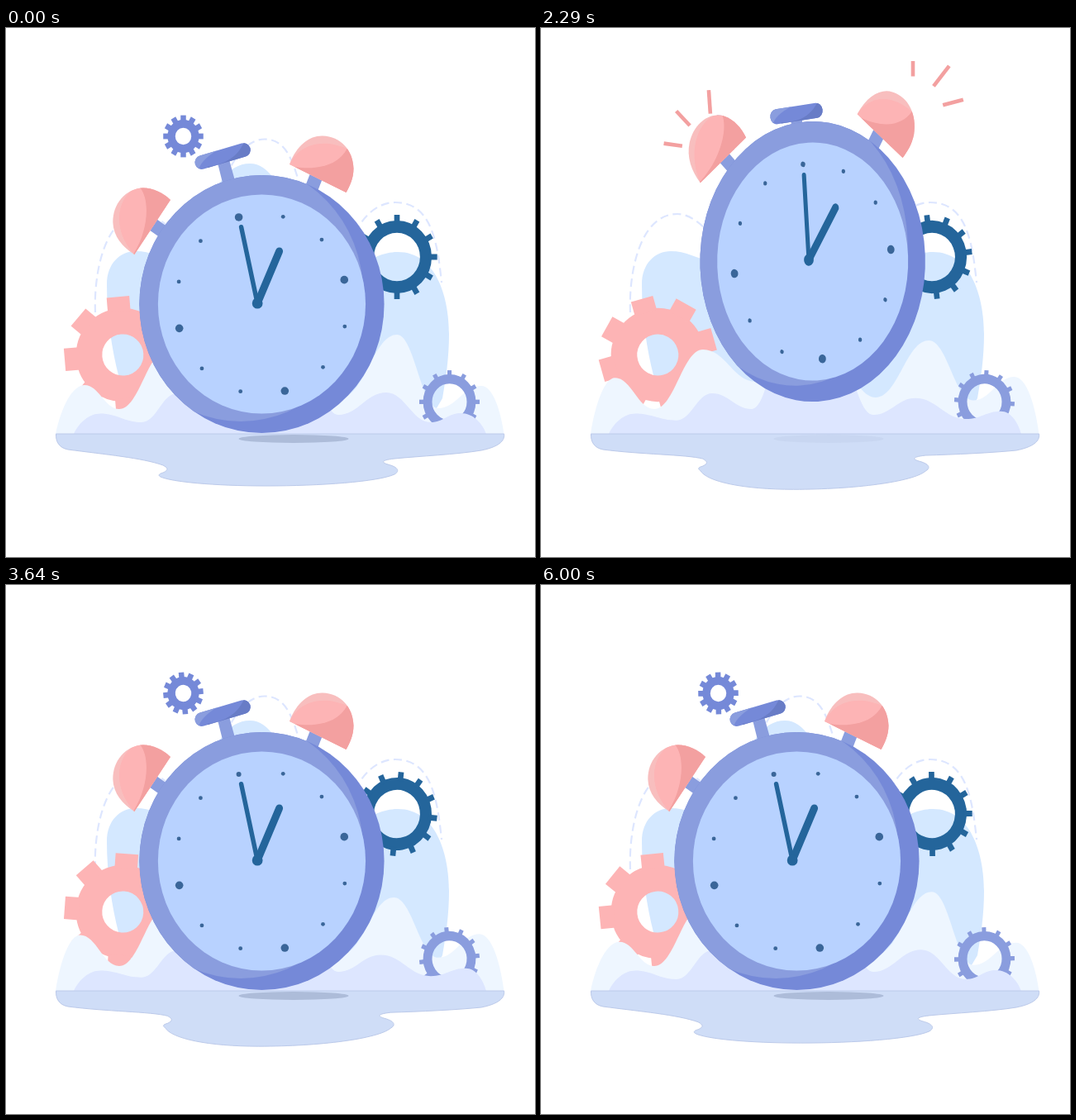
An HTML page with a canvas that plays this animation: 640x640 px, repeating every 6070 ms.

```html
<!DOCTYPE html>
<html lang="en">
<head>
<meta charset="utf-8">
<title>Alarm clock</title>
<style>
html, body { margin: 0; width: 100%; height: 100%; overflow: hidden; background: #fff; }
canvas { display: block; width: 640px; height: 640px; }
</style>
</head>
<body>
<canvas id="stage"></canvas>
<script>
const canvas = document.getElementById('stage');
const ctx = canvas.getContext('2d');
const dpr = window.devicePixelRatio || 1;
canvas.width = canvas.height = 640 * dpr;

const LOOP = 6070, FRAMES = 85, TAU = Math.PI * 2, RAD = Math.PI / 180;
const C = {
  sky: '#d4e8ff', hill: '#eef6ff', front: '#dde6ff', pool: '#cfddf7', poolLine: '#bccaea',
  rim: '#8a9dde', shade: '#7589d8', deep: '#687cc6', face: '#b8d2ff', hand: '#24659b',
  dot: '#3a6699', pink: '#fdb4b5', rose: '#f3a0a0', glow: '#f8bebe', shadow: '#adbcd9'
};

const clamp = (v) => Math.max(0, Math.min(1, v));
const mix = (a, b, k) => a + (b - a) * k;
const ramp = (t, a, b) => clamp((t - a) / (b - a));
const smooth = (t, a, b) => (1 - Math.cos(Math.PI * ramp(t, a, b))) / 2;

function fill(d, color) {
  ctx.fillStyle = color;
  ctx.fill(typeof d === 'string' ? new Path2D(d) : d);
}

function oval(x, y, rx, ry, color) {
  ctx.beginPath();
  ctx.ellipse(x, y, rx, ry, 0, 0, TAU);
  ctx.fillStyle = color;
  ctx.fill();
}

function line(x1, y1, x2, y2, width, color, cap = 'butt') {
  ctx.beginPath();
  ctx.moveTo(x1, y1);
  ctx.lineTo(x2, y2);
  ctx.lineWidth = width;
  ctx.lineCap = cap;
  ctx.strokeStyle = color;
  ctx.stroke();
}

// Fills a base shape, then paints details clipped to it.
function shaded(d, color, details) {
  ctx.save();
  const p = new Path2D(d);
  fill(p, color);
  ctx.clip(p);
  for (const [part, tone] of details) fill(part, tone);
  ctx.restore();
}

function turned(x, y, deg, draw) {
  ctx.save();
  ctx.translate(x, y);
  ctx.rotate(deg * RAD);
  ctx.translate(-x, -y);
  draw();
  ctx.restore();
}

// Hills between two points on the ground, level at every crest and dip.
function ridge(left, right, turns, color) {
  const base = 491;
  let [x, y] = [left, base];
  ctx.beginPath();
  ctx.moveTo(x, y);
  turns.forEach(([u, v], i) => {
    const ease = (u - x) * 0.42;
    if (i) ctx.bezierCurveTo(x + ease, y, u - ease, v, u, v);
    else ctx.bezierCurveTo(mix(x, u, 0.2), mix(y, v, 0.55), u - ease, v, u, v);
    [x, y] = [u, v];
  });
  ctx.bezierCurveTo(mix(x, right, 0.5), y, mix(x, right, 0.85), mix(y, base, 0.5), right, base);
  ctx.closePath();
  ctx.fillStyle = color;
  ctx.fill();
}

const backHills = (k) => ridge(60, 602.5, [
  [95 - 7 * k, 432 - 11 * k], [137, 461], [196, 389], [260, 428], [325, 340], [405, 447],
  [473 - 5 * k, 371 + 9 * k], [523, 460 - 12 * k], [575 - 3 * k, 433 - 14 * k]
], C.hill);

const frontHills = (k) => ridge(82, 581, [
  [114, 466.5], [164, 477 - 3 * k], [207, 442], [255, 461], [310, 330], [340, 330], [402, 468],
  [460 - 9 * k, 441 + 8.5 * k], [514, 477 - 5 * k], [550 + 8 * k, 466 - 3 * k]
], C.front);

function gear(x, y, hole, body, tip, teeth, width, deg, color, squash = 0.955) {
  ctx.save();
  ctx.translate(x, y);
  ctx.scale(squash, 1);
  ctx.rotate(deg * RAD);
  ctx.beginPath();
  ctx.arc(0, 0, (hole + body) / 2, 0, TAU);
  ctx.lineWidth = body - hole;
  ctx.strokeStyle = color;
  ctx.stroke();
  ctx.fillStyle = color;
  for (let i = 0; i < teeth; i++) {
    ctx.fillRect(-width / 2, -tip, width, tip - body + 4);
    ctx.rotate(TAU / teeth);
  }
  ctx.restore();
}

// The lower basin narrows and deepens as k grows.
function pool(k) {
  const r = -6 * k, rise = -5 * k, l = 7 * k, up = -10 * k, deep = 554 + 5.4 * k;
  const p = new Path2D(`M60.5 491H602.5C604 500 595 507 575 511
    C545 ${516 + rise / 2} 500 ${518 + rise / 2} ${470 + r} ${521 + rise}
    C${452 + r} ${523 + rise} ${455 + r} ${526 + rise} ${462 + r} ${528 + rise}
    C${474 + r} ${531 + rise} ${477 + r} ${536 + rise} ${470 + r} ${540 + rise}
    C450 549 380 ${deep} ${315 + 2 * r} ${deep}
    C${250 + r} ${deep} 200 549 ${187 + l} ${543 + up}
    C${183 + l} ${541 + up} ${186 + l} ${539 + up} ${190 + l} ${538 + up}
    C${197 + l} ${535 + up} ${196 + l} ${532 + up} ${190 + l} ${529 + up}
    C${165 + 2 * l} ${520 + up / 2} 120 516 75 510C64 508 60 500 60.5 491Z`);
  fill(p, C.pool);
  ctx.lineWidth = 1;
  ctx.strokeStyle = C.poolLine;
  ctx.stroke(p);
}

const cloud = 'M150 470L136 420C128 388 122 350 122 310C122 285 138 270 157 270C175 270 188 278 205 283' +
  'C235 285 240 164 295 164C345 164 345 290 420 285C445 280 455 271 474 271C520 271 536 325 536 370' +
  'C536 400 532 425 528 448L515 470Z';
const trail = new Path2D('M108 344C106 300 118 225 165 225C192 225 210 262 225 262C245 262 262 134.5 313 134.5' +
  'C345 134.5 350 175 362 212C380 240 400 275 428 238C440 220 455 211 471 211C515 211 522 260 527 308');

function dashes() {
  ctx.save();
  ctx.setLineDash([10, 5.5]);
  ctx.lineWidth = 2.2;
  ctx.strokeStyle = C.front;
  ctx.stroke(trail);
  ctx.restore();
}

// Clock at rest: centre, stretch and tilt.
const CX = 309.5, CY = 334, SX = 0.974, SY = 1.026, TILT = -15.6;

// The clock leaps, sags a little in the air, drops and lands on its lower edge.
function leap(t) {
  const rise = smooth(t, 1880, 2340);
  const sag = smooth(t, 2290, 2860);
  const fall = ramp(t, 3000, 3370) ** 2;
  const air = rise * (1 - smooth(t, 3290, 3470));
  const lift = rise * (1 - fall);
  const tilt = TILT + air * (8.8 - 5.2 * sag);
  const sy = SY + air * (0.092 - 0.049 * sag - 0.086 * fall);
  const sx = 1 / sy;
  return {
    lift, tilt, sx, sy,
    x: 349.3 - 4 * lift + 152 * sx * Math.sin(tilt * RAD),
    y: CY - 53 * lift,
    press: rise * (1 - sag)
  };
}

function rightBell() {
  shaded('M343 165C352 141 368 130 383 130.5C405 131 420 148 420.5 170C420.5 181 416 191 411.5 199Z', C.glow, [
    ['M343 165C352 145 378 131 412.5 146L425 200H411Z', C.pink],
    ['M412.5 146C404 163 382 173 349 168L411 205L425 200V146Z', C.rose]
  ]);
}

function leftBell() {
  shaded('M199 208C190 199 178 193.5 166 193.5C145 194 129 213 129.5 235C130 252 141 265 155.5 274Z', C.glow, [
    ['M160 193C138 199 124 240 155.5 274L205 208L166 190Z', C.pink],
    ['M161 192C174 204 174 243 154 274L205 274V190Z', C.rose]
  ]);
}

function button() {
  fill('M256 163L270 159L278 188L263 191Z', C.rim);
  shaded('M234.5 154.6L285 139.6A8.2 8.2 0 0 1 290 155.6L239.5 170.6A8.2 8.2 0 0 1 234.5 154.6Z', C.shade, [
    ['M232 176C234 163 243 155 262 144L220 145V176Z', C.rim],
    ['M244 168C268 164 281 155 289 136L305 140V165L245 180Z', C.deep]
  ]);
}

function hand(deg, len, width) {
  ctx.save();
  ctx.translate(304.2, 333);
  ctx.scale(SX, SY);
  ctx.rotate(deg * RAD);
  line(0, 0, 0, -len, width, C.hand, 'round');
  ctx.restore();
}

function clock(t, pose) {
  const ringing = t > 1570 && t < 2720;
  const swing = (amp, period) => ringing ? amp * Math.cos(TAU * (t - 2290) / period) : 0;
  ctx.save();
  ctx.translate(pose.x, pose.y);
  ctx.scale(pose.sx, pose.sy);
  ctx.rotate((pose.tilt - TILT) * RAD);
  ctx.scale(1 / SX, 1 / SY);
  ctx.translate(-CX, -CY);

  ctx.save();
  ctx.translate(3 * pose.press, 20 * pose.press);
  button();
  ctx.restore();
  fill('M368 176L383 182L376 200L361 194Z', C.rim);
  fill('M182 231L199 243L190 256L173 244Z', C.rim);
  turned(378, 181, swing(4, 279), rightBell);
  turned(178, 241, swing(8, 289), leftBell);

  ctx.save();
  oval(CX, CY, 148, 156, C.shade);
  ctx.clip();
  oval(284, 320, 148, 156, C.rim);
  ctx.restore();
  oval(CX, CY, 125.5, 132.5, C.face);

  const topDot = mix(4.8, 3, ramp(t, 0, 600));
  for (let i = 0; i < 12; i++) {
    const a = (i * 30 + TILT) * RAD;
    const r = i === 0 ? topDot : i % 3 ? 2.4 : 4.8;
    oval(CX + 106.3 * SX * Math.sin(a), CY - 106.3 * SY * Math.cos(a), r, r, C.dot);
  }

  const spin = 360 * smooth(t, 0, 1930);
  hand(23.9 - spin, 67, 9.2);
  hand(-12.6 + spin, 92, 5.6);
  oval(304.2, 333, 6.4, 6.6, C.hand);
  ctx.restore();
}

// Three rays fanning out from a point, drawn to a share k of their length.
function burst(x, y, first, step, ends, k) {
  ends.forEach((end, i) => {
    const start = 44.5 - 3.5 * i;
    turned(x, y, first + i * step, () => line(x, y - start, x, y - mix(start, end, k), 4.6, C.rose));
  });
}

function draw(t) {
  const u = t / LOOP;
  const sway = Math.min(t / 2900, (LOOP - t) / (LOOP - 2900));
  const pose = leap(t);
  ctx.setTransform(dpr, 0, 0, dpr, 0, 0);
  ctx.fillStyle = '#fff';
  ctx.fillRect(0, 0, 640, 640);

  fill(cloud, C.sky);
  dashes();
  gear(214.5, 131, 10.2, 20, 25.4, 12, 6.8, 90 * u, C.shade);
  gear(473, 277, 29.2, 44, 51, 12, 7, 60 * u, C.hand);
  gear(141.3, 395.5, 25, 56.5, 70.5, 8, 27.5, 90 * u - 4.8, C.pink, 1);
  backHills(sway);
  gear(536.5, 452.3, 22, 33.4, 38.2, 12, 5.3, 90 * u, C.rim);
  frontHills(sway);

  pool(sway);
  ctx.globalAlpha = 1 - 0.8 * Math.sqrt(pose.lift);
  oval(348, 497, 66.5, 5, C.shadow);
  ctx.globalAlpha = 1;
  clock(t, pose);

  const rays = Math.min(ramp(t, 2000, 2220), 1 - ramp(t, 2440, 2690));
  if (rays > 0) {
    burst(450, 103, 0, 37.5, [63, 72, 63], rays);
    burst(208, 148, -4, -39, [73, 65, 60], rays);
  }
}

const start = performance.now();
function tick() {
  const step = LOOP / FRAMES;
  const n = Math.floor(((performance.now() - start) % LOOP) / step + 0.06) % FRAMES;
  draw(Math.round(n * step / 10) * 10);
  requestAnimationFrame(tick);
}
tick();
</script>
</body>
</html>
```
